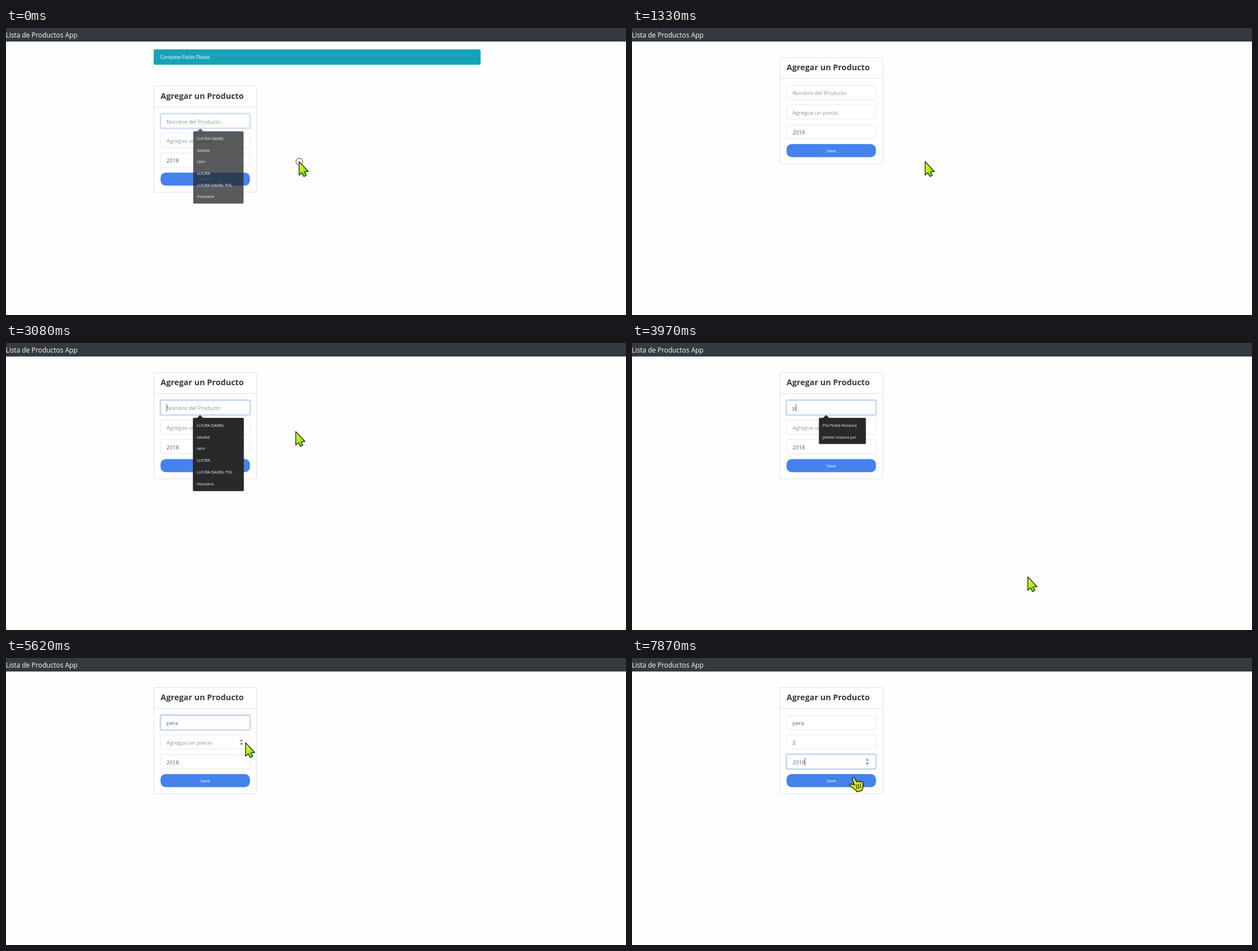
Recreate the animation shown at these times as an HTML page. Size 1099 px wide and 510 px high, loop 8000 ms.

```html
<!DOCTYPE html>
<html lang="es">
<head>
<meta charset="utf-8">
<title>Lista de Productos App</title>
<style>
  html, body { margin: 0; width: 100%; height: 100%; overflow: hidden; background: #fefefe; }
  svg { display: block; }
  text { font-family: "Open Sans", "Noto Sans", sans-serif; white-space: pre; }
  .nav { font-size: 11.9px; fill: #fff; }
  .note { font-size: 8.2px; fill: #fff; }
  .title { font-size: 14.35px; font-weight: 700; fill: #343a40; }
  .value { font-size: 9.53px; fill: #5a5f64; }
  .value.empty { fill: #8b939a; }
  .save { font-size: 7.9px; fill: #fff; text-anchor: middle; }
  .item { font-size: 7px; fill: #f1f1f1; }
  .box { fill: #fff; stroke: #e7e7e7; }
  .focus .box { stroke: #b5cdf7; }
  .ring { fill: none; stroke: #c9dbf9; stroke-width: 2; }
</style>
</head>
<body>
<svg id="stage" width="1099" height="510" viewBox="0 0 1099 510">
  <defs>
    <linearGradient id="lime" x1="0" y1="0" x2="0.8" y2="1">
      <stop offset="0" stop-color="#f0f25a"/>
      <stop offset="0.5" stop-color="#b4f216"/>
      <stop offset="1" stop-color="#62dc12"/>
    </linearGradient>
  </defs>

  <rect width="1099" height="24" fill="#343a40"/>
  <text class="nav" x="-0.5" y="16.6">Lista de Productos App</text>

  <g id="alert">
    <rect x="261.8" y="38" width="579.5" height="27.2" rx="2" fill="#17a2b8"/>
    <text class="note" x="273.5" y="54.6">Complete Fields Please</text>
  </g>

  <g id="form">
    <rect x="262" y="52.5" width="182.3" height="188.8" rx="2" fill="#fff" stroke="#dfdfdf"/>
    <path d="M262.5 89.8H444" stroke="#dfdfdf"/>
    <text class="title" x="274" y="75">Agregar un Producto</text>
    <g id="fields"></g>
    <rect x="274" y="206.3" width="158.4" height="23.2" rx="9" fill="#4582ec"/>
    <text class="save" x="353.2" y="220.6">Save</text>
    <g id="popup"></g>
  </g>

  <circle id="click" r="6" fill="none" stroke="#333"/>
  <g id="pointer">
    <path id="arrow" d="M0.6 0.5V24.6L5.4 20.2L9 26.8L13.2 24.8L10.2 18.6L17 18Z"
      fill="url(#lime)" stroke="#25301c" stroke-width="1.4" stroke-linejoin="round"/>
    <path id="small" d="M0.4 0V9L2.4 7.2L3.9 10.6L5.3 10L3.8 6.8L6.4 6.6Z"
      fill="#fff" stroke="#333" stroke-width="0.8" stroke-linejoin="round"/>
    <path id="beam" d="M-2 -6H2M0 -6V6M-2 6H2" fill="none" stroke="#444" stroke-width="0.9"/>
    <g id="hand" stroke="#222a18" stroke-linejoin="round" stroke-linecap="round">
      <path d="M1.6 3.6Q2 0.4 5 1.4L9.4 9.6Q11.4 7.4 13.2 9Q15.4 7.2 17 9Q19.8 8.2 20.6 11.6L20.4 19.4L18.6 24.6L9.6 26.8L7.6 23.4L-2.4 16.6Q-4.2 13 -0.6 13L5 14.6Z"
        fill="#d3f01c" stroke-width="1.5"/>
      <path d="M8 14L10 21.5M11.6 13.2L13 20.8M15.4 12.4L16 20" fill="none" stroke-width="1.3"/>
    </g>
  </g>
</svg>

<script>
const LOOP = 8000;
const $ = id => document.getElementById(id);
const show = (el, on) => { el.style.display = on ? "" : "none"; };

function add(parent, tag, attrs, text) {
  const el = document.createElementNS("http://www.w3.org/2000/svg", tag);
  for (const key in attrs) el.setAttribute(key, attrs[key]);
  if (text) el.textContent = text;
  return parent.appendChild(el);
}

const hints = ["Nombre del Producto", "Agregue un precio", ""];
const lists = {
  all: { width: 90.3, items: ["LUCIRA DAMEL", "sdsdsd", "rami", "LUCIRA DAMEL", "LUCIRA DAMEL POL", "manzana"] },
  match: { width: 83.3, items: ["Pol Pinela Rosaura", "pinela rosaura pol"] }
};
lists.all.items[3] = "LUCIRA";

const fields = hints.map((hint, i) => {
  const y = 102.2 + 34.7 * i;
  const g = add($("fields"), "g", {});
  const ring = add(g, "rect", { class: "ring", x: 273.2, y: y - 1.2, width: 159.8, height: 27.4, rx: 3 });
  add(g, "rect", { class: "box", x: 274.3, y, width: 157.9, height: 25, rx: 2 });
  const label = add(g, "text", { class: "value", x: 284.6, y: y + 17 });
  const caret = add(g, "rect", { y: y + 6, width: 0.8, height: 13.5, fill: "#333" });
  const spin = add(g, "g", { transform: `translate(417.2 ${y + 12.7})` });
  add(spin, "rect", { x: -3.8, y: -6.6, width: 7.6, height: 13.2, fill: "#f0f0f0" });
  add(spin, "path", { d: "M-2.2 -2.2L0 -4.6L2.2 -2.2ZM-2.2 2.2L0 4.6L2.2 2.2Z", fill: "#444" });
  return { g, hint, ring, label, caret, spin };
});

const popups = Object.fromEntries(Object.entries(lists).map(([key, { width, items }]) => {
  const g = add($("popup"), "g", {});
  const height = 4.8 + 20.9 * items.length;
  const shade = add(g, "g", { fill: "#28292b" });
  add(shade, "rect", { x: 331.3, y: 133, width, height, rx: 2 });
  add(shade, "path", { d: "M338.4 133.2L344 128L349.6 133.2Z" });
  items.forEach((item, i) => add(g, "text", { class: "item", x: 338, y: 148.6 + 20.9 * i }, item));
  return [key, { g, shade }];
}));

// Each step: time, then only what changes from the step before.
const start = {
  alert: true, focus: 0, ring: 0.6, caret: false, popup: "all", fade: true,
  values: ["", "", "2018"], spin: [], kind: "arrow", at: [519, 237], click: true
};
const changes = [
  [0, {}],
  [150, { focus: -1, ring: 1, popup: "", fade: false, click: false }],
  [1330, { alert: false }],
  [2540, { at: [492, 206] }],
  [2630, { at: [420, 146] }],
  [2780, { at: [362, 116], kind: "beam", focus: 0, ring: 0.6, caret: true, click: true }],
  [2930, { at: [376, 118], ring: 1, popup: "all", fade: true, click: false }],
  [3080, { at: [513, 157], kind: "arrow", fade: false }],
  [3230, { at: [688, 268] }],
  [3380, { at: [792, 388] }],
  [3530, { at: [701, 415], caret: false }],
  [3970, { values: ["p", "", "2018"], caret: true, popup: "match" }],
  [4120, { values: ["pe", "", "2018"] }],
  [4270, { values: ["per", "", "2018"] }],
  [4740, { values: ["pera", "", "2018"], popup: "" }],
  [4870, { at: [712, 408] }],
  [5020, { at: [718, 370] }],
  [5170, { at: [660, 296] }],
  [5320, { at: [560, 220], caret: false }],
  [5470, { at: [470, 170] }],
  [5620, { at: [424, 150], spin: [1] }],
  [5770, { at: [416, 147], kind: "small" }],
  [5920, { focus: 1, ring: 0.6, values: ["pera", "1", "2018"], caret: true, click: true }],
  [6070, { ring: 1 }],
  [6220, { click: false }],
  [6510, { values: ["pera", "2", "2018"], click: true }],
  [6660, { click: false, caret: false }],
  [6810, { at: [415, 164] }],
  [6960, { at: [407, 191], kind: "arrow" }],
  [7110, { at: [414, 184], kind: "small", spin: [1, 2] }],
  [7260, { at: [415, 182] }],
  [7420, { at: [416, 180] }],
  [7570, { focus: 2, ring: 0.6, values: ["pera", "2", "2019"], caret: true, spin: [2], click: true }],
  [7720, { at: [404, 194], kind: "arrow", ring: 1, click: false }],
  [7870, { at: [389, 211], kind: "hand" }]
];
let last = start;
const steps = changes.map(([time, change]) => {
  last = { ...last, ...change };
  return { time, state: last };
});

function draw(s) {
  show($("alert"), s.alert);
  $("form").setAttribute("transform", `translate(0 ${s.alert ? 50.6 : 0})`);

  fields.forEach((f, i) => {
    const value = s.values[i];
    const active = s.focus === i;
    f.g.classList.toggle("focus", active);
    show(f.ring, active);
    f.ring.style.opacity = s.ring;
    f.label.textContent = value || f.hint;
    f.label.classList.toggle("empty", !value);
    show(f.caret, active && s.caret);
    f.caret.setAttribute("x", 284.6 + (value ? f.label.getComputedTextLength() : 0));
    show(f.spin, s.spin.includes(i));
  });

  for (const key in popups) {
    const { g, shade } = popups[key];
    show(g, s.popup === key);
    shade.style.opacity = s.fade ? 0.77 : 1;
    g.setAttribute("transform", s.fade ? "translate(376.5 133) scale(.987) translate(-376.5 -133)" : "");
  }

  const [x, y] = s.at;
  $("pointer").setAttribute("transform", `translate(${x} ${y})`);
  for (const kind of ["arrow", "small", "beam", "hand"]) show($(kind), s.kind === kind);
  $("click").setAttribute("cx", x + 1);
  $("click").setAttribute("cy", y + 0.5);
  show($("click"), s.click);
}

const origin = performance.now();
let current = null;
function tick() {
  const t = (performance.now() - origin) % LOOP;
  const step = steps.findLast(s => s.time <= t);
  if (step !== current) draw((current = step).state);
  requestAnimationFrame(tick);
}
tick();
</script>
</body>
</html>
```
